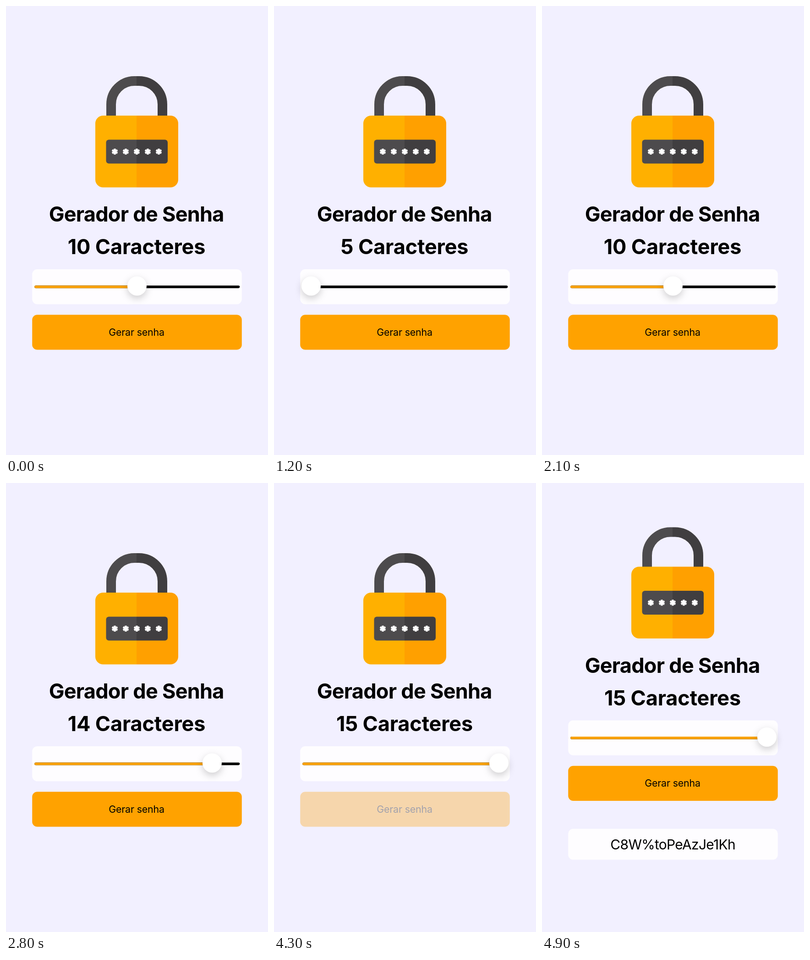
An HTML page that plays this animation: 572 px wide and 979 px high, repeating every 5 s.

```html
<!DOCTYPE html>
<html lang="pt">
<head>
<meta charset="utf-8">
<title>Gerador de Senha</title>
<style>
  html, body { margin: 0; width: 100%; height: 100%; overflow: hidden; background: #f2f0ff; }
  svg { display: block; width: 572px; height: 979px; }
  text { font-family: Inter, "Open Sans", sans-serif; text-anchor: middle; }
  .title { font-size: 45px; font-weight: 700; letter-spacing: -.016em; }
  #count { letter-spacing: -.003em; }
  .label { font-size: 21.4px; letter-spacing: -.008em; }
  .code { font-size: 30px; letter-spacing: -.024em; }
  #thumb { filter: drop-shadow(0 6px 8px rgba(0, 0, 0, .19)); }
</style>
</head>
<body>
<svg viewBox="0 0 572 979">
  <defs>
    <linearGradient id="dark" gradientUnits="userSpaceOnUse" x1="195" x2="376">
      <stop offset=".5" stop-color="#4d4b4d"/><stop offset=".5" stop-color="#403e40"/>
    </linearGradient>
    <linearGradient id="gold" gradientUnits="userSpaceOnUse" x1="195" x2="376">
      <stop offset=".5" stop-color="#ffb000"/><stop offset=".5" stop-color="#ffa000"/>
    </linearGradient>
    <path id="star" d="M0-6.6V6.6M-5.7-3.3L5.7 3.3M-5.7 3.3L5.7-3.3" stroke="#fff" stroke-width="4.4"/>
  </defs>
  <g id="form">
    <path d="M229.5 241V214.5a51 51 0 0 1 51-51h10a51 51 0 0 1 51 51V241" fill="none" stroke="url(#dark)" stroke-width="21"/>
    <rect x="195" y="239" width="181" height="156.5" rx="17" fill="url(#gold)"/>
    <rect x="218.5" y="291.5" width="134.5" height="52" rx="6" fill="url(#dark)"/>
    <use href="#star" x="237.5" y="317.5"/>
    <use href="#star" x="261.5" y="317.5"/>
    <use href="#star" x="285.5" y="317.5"/>
    <use href="#star" x="309.5" y="317.5"/>
    <use href="#star" x="333.5" y="317.5"/>
    <text class="title" x="284.7" y="470">Gerador de Senha</text>
    <text class="title" id="count" x="285" y="541"></text>
    <rect x="57.2" y="574" width="457.6" height="76.3" rx="11" fill="#fefdff"/>
    <g stroke-width="5.8" stroke-linecap="round">
      <path d="M65 612.3H507.5" stroke="#000"/>
      <path id="fill" stroke="#f9a20b"/>
    </g>
    <circle id="thumb" cy="610.5" r="21" fill="#fff"/>
    <g id="button">
      <rect x="57.2" y="673.2" width="457.6" height="76.3" rx="11" fill="#ffa200"/>
      <text class="label" x="285" y="718.5">Gerar senha</text>
    </g>
  </g>
  <g id="result">
    <rect x="57.2" y="754" width="457.6" height="67.5" rx="11" fill="#fefdff"/>
    <text class="code" x="285.7" y="799">C8W%toPeAzJe1Kh</text>
  </g>
</svg>
<script>
  const LOOP = 5000, PRESS = 4000, RELEASE = 4400, DIM = .32;
  const $ = id => document.getElementById(id);
  const clamp = (x, lo, hi) => Math.max(lo, Math.min(hi, x));
  const ease = x => { x = clamp(x, 0, 1); return x * x * (3 - 2 * x); };

  // The drag goes down to 5, then up to 15, in whole steps.
  function lengthAt(t) {
    return t < 1200
      ? clamp(10 - Math.floor((t - 150) / 150), 5, 10)
      : clamp(5 + Math.floor((t - 1200) / 175), 5, 15);
  }

  function opacityAt(t) {
    return t < RELEASE
      ? 1 - (1 - DIM) * ease((t - PRESS) / 150)
      : DIM + (1 - DIM) * ease((t - RELEASE - 50) / 250);
  }

  function draw(t) {
    const n = lengthAt(t), x = 81 + 41 * (n - 5), done = t >= RELEASE;
    $('count').textContent = n + ' Caracteres';
    $('fill').setAttribute('d', `M65 612.3H${x}`);
    $('thumb').setAttribute('cx', x);
    $('button').setAttribute('opacity', opacityAt(t));
    $('form').setAttribute('transform', `translate(0 ${done ? -56.5 : 0})`);
    $('result').setAttribute('visibility', done ? 'visible' : 'hidden');
  }

  const start = performance.now();
  function tick() {
    draw((performance.now() - start) % LOOP);
    requestAnimationFrame(tick);
  }
  tick();
</script>
</body>
</html>
```
